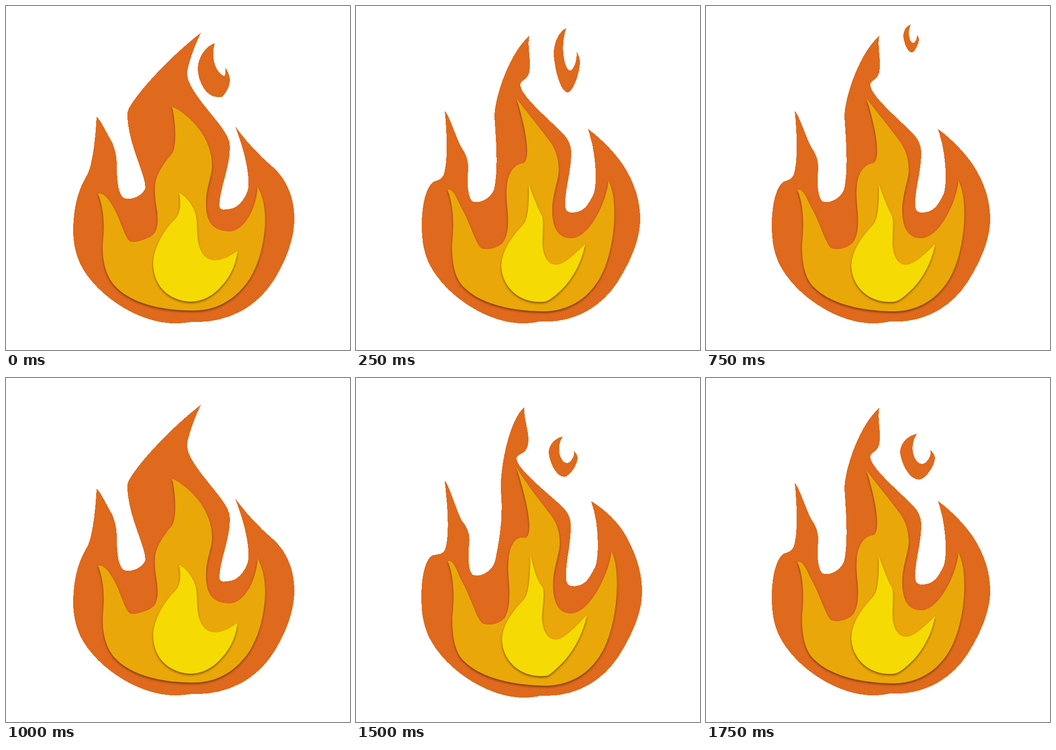
Animation of 748x748 px, one loop 2.04 s. Source, as an HTML page:

```html
<!DOCTYPE html>
<html lang="en">
<head>
<meta charset="utf-8">
<title>Flame</title>
<style>
  html, body { margin: 0; height: 100%; overflow: hidden; background: #fff; }
  svg { display: block; width: 100vw; height: 100vh; }
  .shaded { filter: drop-shadow(0 3px 2px rgba(50, 20, 0, .55)); }
</style>
</head>
<body>
<svg viewBox="0 0 748 748">
  <g id="flame">
    <path id="outer" fill="#df691c" shape-rendering="crispEdges"/>
    <path id="middle" class="shaded" fill="#eaa709"/>
    <path id="inner" class="shaded" fill="#f6da03"/>
  </g>
  <path id="spark" fill="#df691c" shape-rendering="crispEdges"/>
</svg>
<script>
// Each layer: the wide pose and the narrow pose, with matching path commands.
const layers = {
  outer: [
    `M424,58 C413,80 404,104 399,122 C396,133 393,142 394,150 C396,180 444,230 469,264
     C480,279 487,292 487,307 C487,350 464,400 464,434 C465,444 472,443 480,442
     C505,442 519,420 526,400 C532,365 515,305 498,261 C518,289 545,320 580,350
     C612,378 627,420 627,461 C627,508 609,552 585,592 C540,665 470,690 404,687
     C390,689 380,690 366,690 C290,690 195,630 161,560 C147,530 146,500 146,485
     C147,440 155,405 173,373 C177,367 181,358 184,346 C191,318 195,280 197,240
     C207,250 217,273 231,297 C240,318 241,335 241,352 C241,385 246,410 255,417
     C270,424 296,414 303,396 C304,365 262,295 264,231 C270,205 350,115 424,58Z`,
    `M377,65 C372,85 380,115 378,135 C376,164 359,158 357,171 C358,194 412,240 447,274
     C462,289 468,302 468,318 C468,365 454,395 455,435 C456,449 464,449 473,449
     C500,447 508,425 517,408 C525,385 522,315 504,267 C530,286 561,316 581,346
     C607,386 618,425 618,465 C617,513 594,560 569,600 C530,660 468,690 400,686
     C386,689 376,690 362,690 C285,690 190,628 157,556 C144,525 143,500 143,470
     C144,430 152,395 168,382 C178,379 187,377 191,366 C199,340 199,290 193,228
     C203,238 217,285 229,307 C240,322 245,338 244,355 C241,390 244,415 252,424
     C268,432 295,418 301,396 C309,350 305,300 301,240 C302,195 335,100 377,65Z`
  ],
  middle: [
    `M361,219 C385,229 413,254 430,283 C442,304 448,326 448,347 C448,370 436,392 435,425
     C434,468 448,488 483,490 C515,492 544,445 547,393 C560,415 565,445 563,480
     C560,515 553,555 530,593 C505,632 465,660 415,662 C350,664 275,650 238,610
     C214,585 208,545 211,510 C215,470 211,435 200,408 C215,406 226,425 232,435
     C250,465 258,505 270,512 C280,516 300,508 312,503 C332,492 330,470 329,450
     C325,425 323,410 324,390 C326,365 345,340 360,322 C371,310 370,255 361,219Z`,
    `M349,201 C368,226 402,268 422,295 C436,315 441,335 441,358 C440,380 429,405 427,435
     C425,480 438,504 466,505 C505,507 544,430 549,380 C561,405 563,435 561,475
     C558,510 550,560 527,597 C500,640 460,662 412,664 C350,664 275,652 235,612
     C212,590 208,550 209,515 C213,480 213,435 199,400 C212,395 222,425 229,438
     C250,475 260,518 273,527 C290,532 308,525 318,516 C332,500 331,470 330,450
     C328,430 326,410 328,390 C332,355 350,343 363,342 C380,336 372,275 349,201Z`
  ],
  inner: [
    `M377,407 C392,413 414,440 415,470 C416,490 415,515 424,532 C431,546 440,553 456,553
     C476,552 490,541 503,533 C501,560 488,590 465,613 C447,632 425,643 400,643
     C350,640 320,605 320,560 C320,530 340,490 368,463 C382,447 379,425 377,407Z`,
    `M376,388 C384,410 395,440 405,457 C409,470 405,500 406,522 C409,555 425,567 444,561
     C462,554 482,533 498,518 C493,550 475,588 450,614 C432,632 420,641 409,643
     C355,648 316,610 316,563 C318,530 340,500 364,475 C376,460 376,420 376,388Z`
  ]
};

const roundSpark = `M454,81 C436,86 417,110 417,137 C418,165 435,198 460,198
  C466,198 469,198 471,197 C482,184 487,172 487,160 C486,150 482,141 477,134
  C478,142 477,152 474,152 C463,150 442,120 454,81Z`;
// Drawn in a 100 by 100 box and fitted to each step's box.
const unitSpark = `M48,0 C20,5 0,22 0,40 C2,62 25,100 54,100 C72,100 100,70 100,52
  C99,46 93,40 87,36 C91,50 74,66 63,66 C42,66 22,30 48,0Z`;

// lean: 0 is the wide pose, 1 the narrow one; box: x, y, width, height of the spark
const steps = [
  { lean: 0, spark: roundSpark },
  { lean: 1, box: [430, 48, 57, 140] },
  { lean: 1.3, box: [430, 38, 46, 100] },
  { lean: 1, box: [429, 40, 34, 61] },
  { lean: 0, spark: "" },
  { lean: 1, box: [417, 133, 50, 75] },
  { lean: 1.3, box: [419, 127, 63, 88] },
  { lean: 1, box: [422, 121, 76, 100] }
];
const STEP = 250, LOOP = 2040;
const el = id => document.getElementById(id);

function morph(from, to, k) {
  const ends = to.match(/\d+/g);
  let i = 0;
  return from.replace(/\d+/g, n => +n + (ends[i++] - n) * k);
}

function fit(path, [x, y, w, h]) {
  return path.replace(/(\d+),(\d+)/g, (_, px, py) => `${x + px * w / 100},${y + py * h / 100}`);
}

function draw({ lean, spark, box }) {
  for (const id in layers) el(id).setAttribute("d", morph(...layers[id], lean));
  el("flame").setAttribute("transform", lean > 1 ? "translate(-2 -5) scale(1.0145)" : "");
  el("spark").setAttribute("d", box ? fit(unitSpark, box) : spark);
}

const start = performance.now();
let shown;
function tick() {
  const time = (performance.now() - start) % LOOP;
  const step = steps[Math.min(steps.length - 1, Math.floor(time / STEP))];
  if (step !== shown) draw(shown = step);
  requestAnimationFrame(tick);
}
tick();
</script>
</body>
</html>
```
